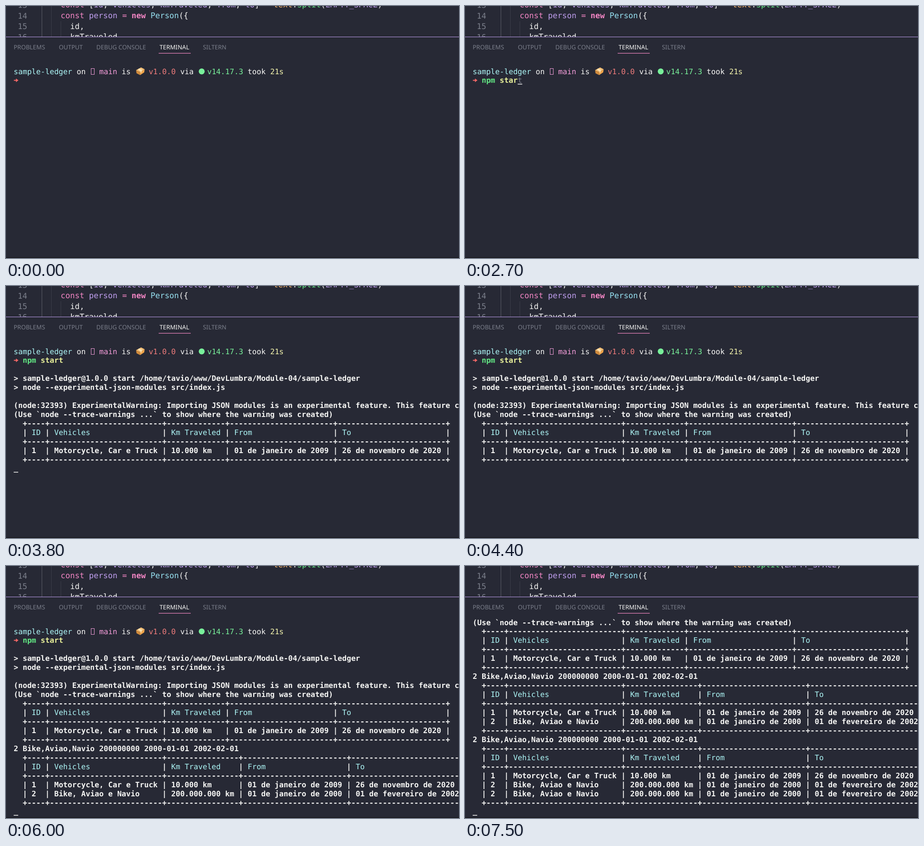
Write an HTML page that moves like this. It is 1003 by 558 pixels and loops after 8 s.

```html
<!DOCTYPE html>
<html lang="en">
<head>
<meta charset="utf-8">
<title>Terminal session</title>
<style>
  html, body { margin: 0; width: 100%; height: 100%; overflow: hidden; background: #272935; }
  svg { display: block; }
  text { white-space: pre; text-rendering: geometricPrecision; fill: #f6f6f4; }
  .code { font: 17.4px "DejaVu Sans Mono", monospace; }
  .term { font: 16.56px "DejaVu Sans Mono", monospace; }
  .tabs { font: 13.4px "Noto Sans", "Open Sans", sans-serif; }
  .tabs text:not(.active), .num { fill: #7b7f8b; }
  .num { text-anchor: end; }
  .b { font-weight: bold; }
  .pink { fill: #f286c4; }
  .purple { fill: #bf9eee; }
  .orange { fill: #ffb86c; }
  .green { fill: #62e884; }
  .cyan { fill: #97e1f1; }
  .red { fill: #ee6666; }
  .yellow { fill: #e7ee98; }
  .hint { fill: #7b7f8b; }
  .aqua { fill: #adf6f6; }
  .rose { fill: #f49dda; }
  .coral { fill: #f07c7c; }
  .mint { fill: #78f09a; }
  .cream { fill: #f6f6ae; }
</style>
</head>
<body>
<svg width="1003" height="558" viewBox="0 0 1003 558">
  <rect width="1003" height="558" fill="#272935"/>

  <clipPath id="editor"><rect width="1003" height="68"/></clipPath>
  <g clip-path="url(#editor)">
    <path d="M79.5 0V68" stroke="#5c5e69"/>
    <path d="M100.5 0V68M121.5 34V68" stroke="#3c3e49"/>
    <g class="code" id="code"></g>
  </g>
  <rect y="68" width="1003" height="1" fill="#bf9eee"/>

  <g class="tabs">
    <text x="17" y="95.7">PROBLEMS</text>
    <text x="117" y="95.7">OUTPUT</text>
    <text x="200" y="95.7">DEBUG CONSOLE</text>
    <text x="340" y="95.7" class="active">TERMINAL</text>
    <text x="436" y="95.7">SILTERN</text>
  </g>
  <rect x="338" y="104" width="71" height="1.2" fill="#f286c4"/>

  <g class="term" id="term"></g>
  <rect id="cursor" width="10" height="1.5" fill="#f6f6f4"/>
  <path id="beam" d="M971.5 396.5H974L974.5 397L975 396.5H977.5M974.5 397V413M971.5 413.5H977.5"
        fill="none" stroke="#f6f6f4"/>
  <rect y="556" width="1003" height="2" fill="#1a1b22"/>
</svg>

<script>
const LOOP = 8000, LEFT = 17, CELL = 9.97, PITCH = 19.95, BASE = 150.5, LAST_ROW = 20;
const $ = id => document.getElementById(id);
const make = (tag, attrs, parent) => {
  const el = document.createElementNS('http://www.w3.org/2000/svg', tag);
  for (const key in attrs) el.setAttribute(key, attrs[key]);
  return parent.appendChild(el);
};

// A span is [text, classes].
function fill(el, spans) {
  el.textContent = '';
  for (const [str, cls = ''] of spans) make('tspan', { class: cls }, el).textContent = str;
}

// Editor lines
const comma = [', '];
const code = [
  [13, 0, [['const', 'pink'], [' ['], ['id', 'purple'], comma, ['vehicles', 'purple'], comma,
    ['kmTraveled', 'purple'], comma, ['from', 'purple'], comma, ['to', 'purple'], ['] '],
    ['= ', 'pink'], ['text', 'orange'], ['.'], ['split', 'green'], ['('],
    ['EMPTY_SPACE', 'purple'], [')']]],
  [14, 0, [['const', 'pink'], [' person ', 'purple'], ['= ', 'pink'], ['new', 'pink b'],
    [' Person', 'cyan'], ['({']]],
  [15, 2, [['id,']]],
  [16, 2, [['kmTraveled,']]]
];
code.forEach(([num, indent, spans], i) => {
  const y = 3.4 + i * 23.6;
  make('text', { x: 47, y: y + 0.6, class: 'num' }, $('code')).textContent = num;
  fill(make('text', { x: 121 + indent * 10.48, y }, $('code')), spans);
});

// Terminal rows
const bold = str => [[str, 'b']];
const project = 'sample-ledger';
const entry = '2 Bike,Aviao,Navio 200000000 2000-01-01 2002-02-01';
const header = ['ID', 'Vehicles', 'Km Traveled', 'From', 'To'];
const first = ['1', 'Motorcycle, Car e Truck', '10.000 km', '01 de janeiro de 2009', '26 de novembro de 2020'];
const second = ['2', 'Bike, Aviao e Navio', '200.000.000 km', '01 de janeiro de 2000', '01 de fevereiro de 2002'];

function table(...data) {
  const widths = header.map((_, c) => Math.max(...[header, ...data].map(r => r[c].length)));
  const rule = bold('  +' + widths.map(w => '-'.repeat(w + 2) + '+').join(''));
  const row = (cells, cls) => [['  |', 'b'],
    ...cells.flatMap((s, c) => [[' ' + s.padEnd(widths[c] + 1), cls], ['|', 'b']])];
  return [rule, row(header, 'aqua'), rule, ...data.map(r => row(r, 'b')), rule];
}

const lines = [
  [[project, 'aqua'], [' on    '.slice(0, 6)], ['main', 'rose'], [' is    '], ['v1.0.0', 'coral'],
    [' via   '], ['v14.17.3', 'mint'], [' took '], ['21s', 'cream']],
  [],
  [],
  bold(`> ${project}@1.0.0 start /home/tavio/www/DevLumbra/Module-04/${project}`),
  bold('> node --experimental-json-modules src/index.js'),
  [],
  bold('(node:32393) ExperimentalWarning: Importing JSON modules is an experimental feature. This feature could change at any time'),
  bold('(Use `node --trace-warnings ...` to show where the warning was created)'),
  ...table(first),
  bold(entry),
  ...table(first, second),
  bold(entry),
  ...table(first, second, second)
];
lines[0][1] = [' on   '];

const rows = lines.map((spans, i) => {
  const g = make('g', {}, $('term'));
  fill(make('text', { x: LEFT, y: BASE + i * PITCH }, g), spans);
  return g;
});

// Prompt symbols
const shape = (row, d, color) => make('path', { d, fill: color }, rows[row]);
make('rect', { x: 188.5, y: 138.5, width: 7, height: 13, fill: 'none', stroke: '#f49dda' }, rows[0]);
shape(0, 'M288 142L299 136L307 140L296 146Z', '#f3c077');
shape(0, 'M288 142L296 146L297 153L289 149Z', '#d08a3c');
shape(0, 'M296 146L307 140L306 147L297 153Z', '#eda44c');
shape(0, 'M292 140L295 138.3L303 142.3L300 144V147L298 148V145Z', '#fbe3b5');
make('circle', { cx: 433.3, cy: 144.8, r: 6.6, fill: '#78f09a' }, rows[0]);
shape(1, 'M17.5 163.4H22V160.4L27.6 164.6L22 168.8V165.8H17.5Z', '#ee6666');

const command = make('text', { x: LEFT + 2 * CELL, y: BASE + PITCH }, rows[1]);

// time, typed, suggestion, rows shown, cursor column (-1 hides it), cursor row
const steps = [
  [0, '', '', 2, -1, 1],
  [100, '', '', 2, 2, 1],
  [400, 'n', 'pm satrt', 2, 3, 1],
  [500, 'np', 'm satrt', 2, 4, 1],
  [800, 'npm', ' satrt', 2, 5, 1],
  [1100, 'npm ', 'satrt', 2, 6, 1],
  [1200, 'npm s', 'atrt', 2, 7, 1],
  [1400, 'npm sa', 'trt', 2, 8, 1],
  [1800, 'npm satr', 't', 2, 10, 1],
  [2100, 'npm sa', 'trt', 2, 8, 1],
  [2400, 'npm st', 'art', 2, 8, 1],
  [2600, 'npm sta', 'rt', 2, 9, 1],
  [2700, 'npm star', 't', 2, 10, 1],
  [2900, 'npm start', '', 2, 11, 1],
  [3400, 'npm start', '', 3, 0, 2],
  [3600, 'npm start', '', 6, 0, 6],
  [3800, 'npm start', '', 13, 0, 13],
  [4400, 'npm start', '', 13, -1, 13],
  [5000, 'npm start', '', 14, 50, 13],
  [5400, 'npm start', '', 14, -1, 13],
  [6000, 'npm start', '', 20, 0, 20],
  [6700, 'npm start', '', 20, -1, 20],
  [7000, 'npm start', '', 21, 50, 20],
  [7500, 'npm start', '', 28, 0, 28]
];

const show = (el, on) => { el.style.display = on ? '' : 'none'; };

function draw([, typed, hint, count, col, row]) {
  const scroll = Math.max(0, row - LAST_ROW);
  rows.forEach((el, i) => show(el, i < count && i >= scroll - 1));
  $('term').setAttribute('transform', `translate(0 ${-scroll * PITCH})`);
  fill(command, [
    [typed.slice(0, 3), typed.startsWith('npm') ? 'b green' : 'b red'],
    [typed.slice(3), 'b yellow'],
    [hint, 'hint']
  ]);
  show($('cursor'), col >= 0);
  $('cursor').setAttribute('x', LEFT + col * CELL);
  $('cursor').setAttribute('y', 172.2 + (row - scroll - 1) * PITCH);
}

const start = performance.now();
let current;
function tick() {
  const t = (performance.now() - start) % LOOP;
  const step = steps.findLast(s => s[0] <= t);
  if (step !== current) draw(current = step);
  show($('beam'), t >= 4200 && t < 4400);
  requestAnimationFrame(tick);
}
tick();
</script>
</body>
</html>
```
